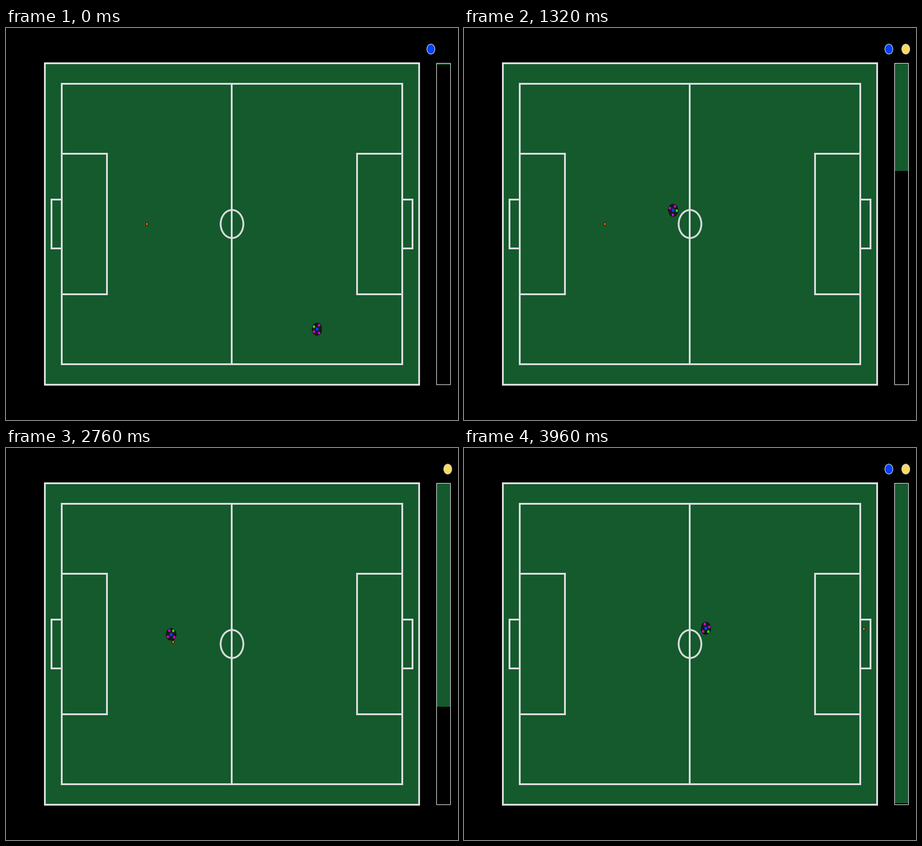
These frames come from a looping animation (750x650 px, 4.01 s). A matplotlib script:

```python
import numpy as np
import matplotlib.pyplot as plt
from matplotlib.animation import FuncAnimation
from matplotlib.patches import Ellipse, Polygon, Rectangle

W, H, DPI = 750, 650, 100
PX = 72 / DPI
STEP, LAST, LOOP = 20, 198, 4010
CX, CY = 375, 325
SX, SY = 565 / 15, 465 / 10      # pixels per metre
GREEN, LINE, BLUE, YELLOW = "#145a2d", "#dcdcdc", "#0040ff", "#fada5e"
PINK, LIME, ORANGE, DARK = "#dc00dc", "#39dc14", "#fd6a02", "#191919"

# key poses: ms, x, y, heading in degrees
KEYS = np.array([
    (0, 516.2, 499.4, 0), (780, 446, 420, 186), (1080, 390, 341.5, 206),
    (1320, 347, 302.3, 208), (2100, 243.3, 316.2, 194),
    (2760, 274, 309.3, 267), (3300, 359, 305, 400),
    (3540, 384, 296, 449), (3960, 401.3, 299, 525),
])
T, POSE = KEYS[:, 0], KEYS[:, 1:]
SLOPE = np.gradient(POSE, T, axis=0)
SLOPE[0] = 0                     # starts from rest
CATCH, KICK = 2120, 2900


def robot_pose(t):
    """Cubic Hermite interpolation between the key poses."""
    i = min(np.searchsorted(T, t, side="right") - 1, len(T) - 2)
    h = T[i + 1] - T[i]
    u = (t - T[i]) / h
    v = 1 - u
    return (v * v * (1 + 2 * u) * POSE[i] + u * u * (3 - 2 * u) * POSE[i + 1]
            + u * v * h * (v * SLOPE[i] - u * SLOPE[i + 1]))


def offset(x, y, dist, angle):
    a = np.radians(angle)
    return x + dist * SX * np.cos(a), y - dist * SY * np.sin(a)


def ball_pos(t, x, y, heading):
    """At rest, then carried by the robot, then rolling to the goal."""
    if t < CATCH:
        return CX - 3.75 * SX, CY
    if t < KICK:
        return offset(x, y, 0.282, heading + 22)
    return 444.3 + 0.332 * (t - 3300), 308.2 - 0.0124 * (t - 3300)


fig = plt.figure(figsize=(W / DPI, H / DPI), dpi=DPI, facecolor="black")
ax = fig.add_axes([0, 0, 1, 1])
ax.set(xlim=(0, W), ylim=(H, 0))
ax.axis("off")


def box(x0, y0, x1, y1, face="none", lw=3.0):
    return ax.add_patch(Rectangle((x0, y0), x1 - x0, y1 - y0, fc=face,
                                  ec=LINE, lw=lw * PX, joinstyle="miter",
                                  snap=False))


def oval(x, y, rx, ry, face, edge="none", lw=0.0, z=1):
    return ax.add_patch(Ellipse((x, y), 2 * rx, 2 * ry, fc=face, ec=edge,
                                lw=lw * PX, zorder=z))


# pitch
box(64.5, 58.5, 685.5, 591.5, GREEN)
box(92.5, 92.5, 657.5, 557.5)
ax.plot([374.5, 374.5], [92.5, 557.5], color=LINE, lw=3 * PX,
        solid_capstyle="butt", snap=False)
oval(CX, CY, 0.5 * SX, 0.5 * SY, "none", LINE, 3)
for edge, side in ((92.5, 1), (657.5, -1)):
    for depth, half in ((75, 116.5), (-17, 40.5)):
        x0, x1 = sorted((edge, edge + side * depth))
        box(x0, CY - half, x1, CY + half)

# time bar and lamps
fill = ax.add_patch(Rectangle((714.5, 58.5), 23, 0, fc=GREEN, lw=0))
box(714.5, 58.5, 737.5, 591.5, lw=1)
blue = oval(705, 35, 6.6, 8.2, BLUE, LINE, 1)
yellow = oval(733, 35, 6.6, 8.2, YELLOW, LINE, 1)

# robot and ball
ARC = np.linspace(25, 335, 40)
DOTS = {57.4: PINK, -57.4: PINK, 147.4: LIME, -147.4: PINK}
body = ax.add_patch(Polygon(np.zeros((3, 2)), closed=True, fc=DARK,
                            ec="black", lw=0.5 * PX, zorder=3))
hub = oval(0, 0, 2.4, 2.9, BLUE, z=4)
dots = [oval(0, 0, 1.9, 2.3, color, z=4) for color in DOTS.values()]
ball = oval(0, 0, 2.0, 2.5, ORANGE, "black", 0.7, z=5)


def update(k):
    n = min(k // 2, LAST)
    t = n * STEP
    x, y, heading = robot_pose(t)
    body.set_xy(np.column_stack(offset(x, y, 0.22, heading + ARC)))
    hub.set_center((x, y))
    for dot, angle in zip(dots, DOTS):
        dot.set_center(offset(x, y, 0.1625, heading + angle))
    ball.set_center(ball_pos(t, x, y, heading))
    fill.set_height(533 * (n + 1) / 200)
    blue.set_visible(not 1800 <= t < 3000)
    yellow.set_visible(t % 1000 >= 200)
    return [fill, blue, yellow, body, hub, ball, *dots]


anim = FuncAnimation(fig, update, frames=LOOP // 10, interval=10,
                     repeat=True, repeat_delay=0, cache_frame_data=False)
plt.show()
```
